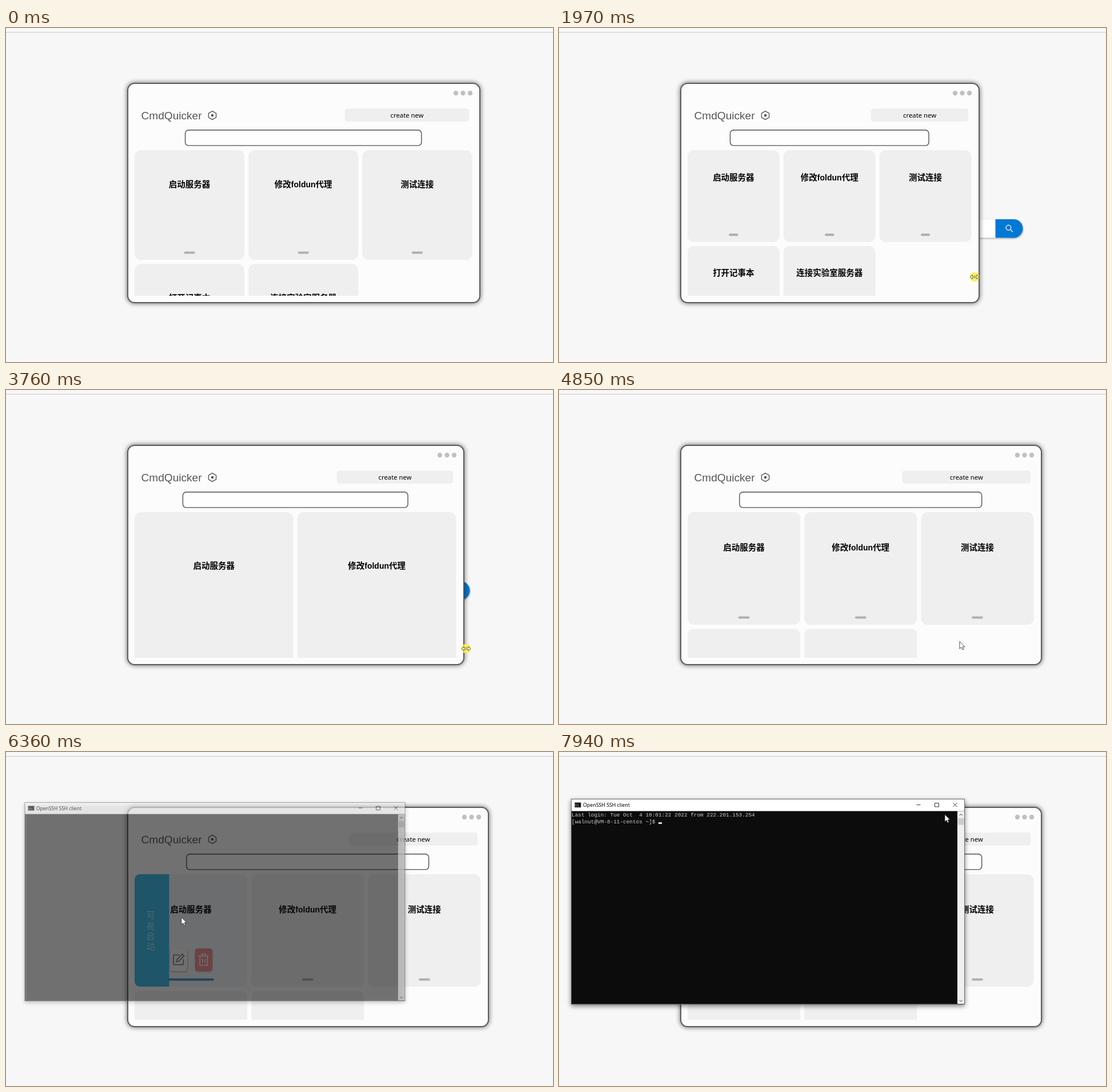
Recreate the animation shown at these times as an HTML page. Size 957x585 px, loop 8 s.

```html
<!DOCTYPE html>
<html lang="zh">
<head>
<meta charset="utf-8">
<style>
html, body { margin: 0; width: 100%; height: 100%; overflow: hidden; background: #f7f7f7; }
svg { display: block; width: 957px; height: 585px; }
text { white-space: pre; }
.label { font: bold 14.5px "Liberation Sans", "Noto Sans CJK SC", "Noto Sans CJK", sans-serif; text-anchor: middle; }
.latin { font-size: 14px; }
.side { font: 14.5px "Noto Sans CJK SC", "Noto Sans CJK", sans-serif; text-anchor: middle; fill: #fff; }
.ui { font-family: "Noto Sans", sans-serif; }
.mono { font: 9.4px "Liberation Mono", monospace; fill: #ccc; }
.line { fill: none; stroke: #333; stroke-width: 1; }
</style>
</head>
<body>
<svg id="stage" viewBox="0 0 957 585">
  <defs>
    <filter id="blur" x="-10%" y="-10%" width="120%" height="120%"><feGaussianBlur stdDeviation="4"/></filter>
    <filter id="soft" x="-30%" y="-30%" width="160%" height="160%"><feGaussianBlur stdDeviation="1.6"/></filter>
    <clipPath id="list"><rect x="214" y="208" width="700" height="261"/></clipPath>
  </defs>
  <rect width="957" height="585" fill="#f7f7f7"/>
  <path d="M0 7.5H957" stroke="#c8c8c8"/>

  <!-- page search field behind the app -->
  <rect x="500" y="336" width="312" height="33" rx="16" fill="#000" opacity=".3" filter="url(#soft)"/>
  <rect x="500" y="335" width="300" height="32.5" rx="16" fill="#fff"/>
  <path d="M763.5 335H796.5a16.3 16.3 0 0 1 0 32.5H763.5Z" fill="#0078d4"/>
  <g fill="none" stroke="#fff" stroke-width="1.3"><circle cx="786.4" cy="349.8" r="4.4"/><path d="M789.6 353L794 357.4"/></g>

  <!-- app window -->
  <rect id="shade" x="212" y="96" height="386" rx="13" fill="#000" opacity=".62" filter="url(#blur)"/>
  <rect id="frame" x="213" y="97" height="384" rx="12" fill="#fcfcfc" stroke="#5c5c5c" stroke-width="2"/>
  <g id="dots" fill="#c0c0c0"><circle cx="-43" cy="114" r="4.2"/><circle cx="-30.5" cy="114" r="4.2"/><circle cx="-18" cy="114" r="4.2"/></g>
  <text x="236.5" y="160" font-family="Liberation Sans, sans-serif" font-size="19.1" fill="#555">CmdQuicker</text>
  <path d="M361 145.6L367.6 149.3V156.7L361 160.4L354.4 156.7V149.3Z" fill="none" stroke="#555" stroke-width="1.4"/>
  <circle cx="361" cy="153" r="2.3" fill="#555"/>
  <rect id="create" y="141" height="23" rx="5" fill="#efefef"/>
  <text id="createText" class="ui" y="157" font-size="11.3" text-anchor="middle">create new</text>
  <rect id="field" y="178.7" height="27.2" rx="6" fill="#fefefe" stroke="#505050" stroke-width="1.4"/>
  <g id="cards" clip-path="url(#list)"></g>

  <!-- terminal -->
  <g id="term">
    <rect id="termShade" x="21" y="85" width="689" height="360" fill="#000" opacity=".5" filter="url(#blur)"/>
    <rect id="termBody" x="21.5" y="103" width="688" height="338.5" fill="#0c0c0c"/>
    <g id="termChrome">
      <rect x="21.5" y="82.5" width="688" height="21" fill="#fff"/>
      <rect x="697" y="103.5" width="12.5" height="338" fill="#f0f0f0"/>
      <rect x="698" y="116" width="10.5" height="11.5" fill="#cdcdcd"/>
      <path class="line" d="M700.6 111.3L703.2 108.7L705.8 111.3M700.6 434.5L703.2 437.1L705.8 434.5"/>
      <rect x="21.5" y="82.5" width="688" height="359" fill="none" stroke="#6a6a6a"/>
      <path d="M21 441.7H710" stroke="#555" stroke-width="1.3"/>
      <rect x="27.5" y="88.5" width="11" height="8.5" fill="#111" stroke="#999" stroke-width=".6"/>
      <text x="28.6" y="95" font-family="Liberation Sans, sans-serif" font-size="4.5" fill="#fff">C:\.</text>
      <text class="ui" x="42" y="96" font-size="8.8">OpenSSH SSH client</text>
      <path class="line" d="M625.5 92.5H632.5M657.5 89.5H664.5V96H657.5ZM689.5 89L696.5 96M696.5 89L689.5 96"/>
    </g>
    <g id="output">
      <text class="mono" x="22" y="113">Last login: Tue Oct  4 10:01:22 2022 from 222.201.153.254</text>
      <text class="mono" x="22" y="124.5">[walnut@VM-8-11-centos ~]$ </text>
    </g>
    <rect id="caret" width="6" height="2.6" fill="#fff"/>
  </g>

  <g id="pointer">
    <g id="sizer">
      <circle id="press" r="8.3" fill="#f9ee52" opacity=".9"/>
      <path d="M-8 0L-4 -3.8V-1.2H4V-3.8L8 0L4 3.8V1.2H-4V3.8Z" fill="#fffbd0" stroke="#55501c" stroke-width=".9"/>
    </g>
    <path id="arrow" d="M0 0V12.8L3 10L5 14.4L7.1 13.5L5.2 9.3H9.2Z" fill="#fff" stroke="#222" stroke-width=".8"/>
  </g>
</svg>
<script>
const LOOP = 8000, LEFT = 225, TOP = 214, GAP = 7.1;
const $ = id => document.getElementById(id);
const clamp = v => Math.max(0, Math.min(1, v));
const lerp = (a, b, p) => a + (b - a) * p;
const set = (el, attrs) => { for (const k in attrs) el.setAttribute(k, attrs[k]); };
const show = (el, on) => { el.style.display = on ? '' : 'none'; };

function add(parent, tag, attrs, html = '') {
  const el = document.createElementNS('http://www.w3.org/2000/svg', tag);
  set(el, attrs);
  el.innerHTML = html;
  parent.appendChild(el);
  return el;
}

// Piecewise linear track: rows of [time, ...values]
function track(rows, t) {
  const i = rows.findIndex(r => r[0] > t);
  if (i === 0) return rows[0].slice(1);
  if (i < 0) return rows[rows.length - 1].slice(1);
  const a = rows[i - 1], b = rows[i], p = (t - a[0]) / (b[0] - a[0]);
  return a.slice(1).map((v, k) => lerp(v, b[k + 1], p));
}

const EDGE = [[1150, 830], [1910, 746], [1970, 736], [2660, 661], [2860, 661],
  [3130, 701], [3620, 800], [3760, 802], [4240, 845]];
const MOUSE = [[330, 942, 562], [950, 827, 449], [1150, 827, 449], [1970, 727, 436],
  [2660, 653, 436], [2860, 657, 436], [3130, 712, 438], [3620, 804, 452], [3760, 805, 453],
  [4240, 844, 466], [4440, 843, 465], [5200, 530, 411], [5830, 288, 276], [6030, 288, 276],
  [6500, 320, 299], [6830, 500, 146], [7400, 640, 98], [7660, 655, 111], [7730, 657, 111], [7940, 675, 109.5]];
const ANCHORS = [0, 330, 1150, 1970, 2860, 3130, 3690, 3760, 4440, 5270, 5830, 6030, 6500, 6900, 7730, 7940];
const STEP = 69, FADE = 300;

function captured(t) {
  const a = ANCHORS.filter(v => v <= t).pop();
  return a + Math.floor((t - a) / STEP) * STEP;
}

const ICONS = `
  <rect x="-36" y="1" width="30" height="40" rx="5" opacity=".55" filter="url(#soft)"/>
  <rect x="7.5" y="1" width="30" height="40" rx="5" opacity=".45" filter="url(#soft)"/>
  <rect x="-36.5" width="30" height="40" rx="5" fill="#f9f9f9"/>
  <rect x="7" width="30.5" height="40" rx="5" fill="#ef5350"/>
  <g fill="none" stroke="#222" stroke-width="1.5" stroke-linejoin="round">
    <path d="M-20 11.5H-30.5V28.5H-13.5V19"/><path d="M-25.5 23.5L-24.5 19.5L-15 10L-12 13L-21.5 22.5Z"/></g>
  <path d="M13.5 13.5H31M19 13V10H25.5V13M15.7 14V29.5H28.8V14M20.2 18.5V25M24.3 18.5V25" fill="none" stroke="#fff" stroke-width="1.5"/>`;

// Hover interval per card
const HOVER = [[5480, 6190], [5270, 5480], null, null, [5210, 5270]];
const NAMES = ['启动服务器', '修改<tspan class="latin">foldun</tspan>代理', '测试连接', '打开记事本', '连接实验室服务器'];
const cards = NAMES.map((name, i) => {
  const g = add($('cards'), 'g', {});
  const card = { g, bg: add(g, 'rect', { rx: 11 }), hover: HOVER[i] };
  if (card.hover) {
    card.fill = add(g, 'path', { fill: '#39b9e8' });
    card.side = add(g, 'g', { class: 'side' },
      [...'可视启动'].map((c, k) => `<text x="28" y="${k * 18.3}">${c}</text>`).join(''));
    card.icons = add(g, 'g', {}, ICONS);
  }
  card.label = add(g, 'text', { class: 'label' }, name);
  card.bar = add(g, 'rect', { height: 4.2, rx: 2.1 });
  return card;
});

function hoverAmount(span, t) {
  if (!span) return 0;
  const peak = clamp((Math.min(t, span[1]) - span[0]) / FADE);
  return clamp(peak - Math.max(0, t - span[1]) / FADE);
}

const mix = (a, b, p) => `rgb(${a.map((v, k) => Math.round(lerp(v, b[k], p)))})`;

function drawCard(card, i, cols, w, t) {
  const p = hoverAmount(card.hover, t);
  set(card.g, { transform: `translate(${LEFT + (i % cols) * (w + GAP)} ${TOP + Math.floor(i / cols) * (w + GAP)})` });
  set(card.bg, { width: w, height: w, fill: mix([239, 239, 239], [239, 246, 250], p) });
  set(card.label, { x: w / 2, y: w * .4 - 11.7 });
  const bw = w * lerp(.1, .6, p);
  set(card.bar, { x: (w - bw) / 2, y: w - 14.7, width: bw, fill: mix([176, 176, 176], [0, 120, 212], p) });
  if (!card.hover) return;
  const fw = w * p / 2, r = Math.min(11, fw);
  set(card.fill, { d: `M${fw} 0H${r}Q0 0 0 ${r}V${w - r}Q0 ${w} ${r} ${w}H${fw}Z` });
  set(card.side, { transform: `translate(0 ${w / 2 - 21.3})`, opacity: p });
  set(card.icons, { transform: `translate(${w / 2} ${w - 67})`, opacity: p });
}

function drawApp(t) {
  const [edge] = track(EDGE, t), inner = edge - 14.5 - LEFT;
  const cols = t >= 2490 && t < 3940 ? 2 : 3;
  const w = (inner - GAP * (cols - 1)) / cols, bw = (edge - 395) / 2;
  set($('shade'), { width: edge - 212 });
  set($('frame'), { width: edge - 214 });
  set($('dots'), { transform: `translate(${edge})` });
  set($('create'), { x: edge - 19.7 - bw, width: bw });
  set($('createText'), { x: edge - 19.7 - bw / 2 });
  set($('field'), { x: LEFT + inner * .15, width: inner * .7 });
  cards.forEach((c, i) => drawCard(c, i, cols, w, t));
}

function drawTerminal(t) {
  show($('term'), t >= 6230);
  const e = 1 - Math.pow(1 - clamp((t - 6230) / 427), 3), s = lerp(.94, 1, e);
  set($('term'), { transform: `translate(365.5 262) scale(${s}) translate(-365.5 -262)` });
  set($('termBody'), { opacity: e });
  set($('termShade'), { opacity: e * .5 });
  set($('termChrome'), { opacity: clamp(e * 1.3) });
  const ready = t >= 6760;
  show($('output'), ready);
  set($('caret'), ready ? { x: 174, y: 123.2 } : { x: 22, y: 112 });
  show($('caret'), t >= 6400 && !(t >= 7320 && t < 7850));
}

function drawPointer(t) {
  const [x, y] = track(MOUSE, t), sizing = t >= 880 && t < 4500;
  show($('pointer'), t >= 330);
  show($('sizer'), sizing);
  show($('press'), t >= 1150 && t < 4240);
  show($('arrow'), !sizing);
  set($('pointer'), { transform: `translate(${x} ${y})` });
}

function draw(now) {
  const t = captured(now % LOOP);
  drawApp(t);
  drawTerminal(t);
  drawPointer(t);
  requestAnimationFrame(draw);
}
draw(performance.now());
</script>
</body>
</html>
```
